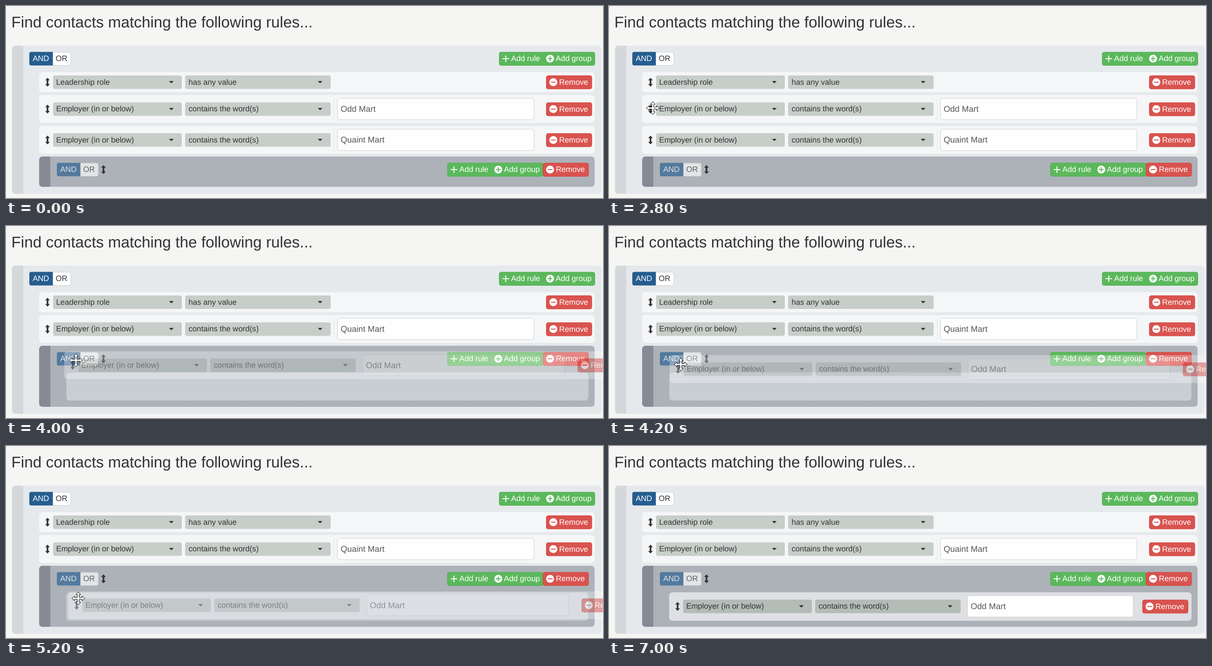
An HTML page for the animation above (8200 ms loop, 1280 by 412 pixels).

```html
<!DOCTYPE html>
<html lang="en">
<head>
<meta charset="utf-8">
<title>Contact rules</title>
<style>
html, body { margin: 0; width: 100%; height: 100%; overflow: hidden; background: #f5f5f4; }
svg { display: block; width: 1280px; height: 412px; }
text { font: 16.7px "Liberation Sans", Arial, sans-serif; fill: #333; text-rendering: geometricPrecision; }
.title { font-size: 33.3px; }
.value { font-size: 18px; fill: #555; }
.light { fill: #fff; }
.row { fill: #fff; fill-opacity: .6; }
.select { fill: #002000; fill-opacity: .19; }
.input { fill: #fefefe; stroke: #ccc; }
.green { fill: #5cb85c; stroke: #4cae4c; }
.red { fill: #d9534f; stroke: #d43f3a; }
.line { fill: none; stroke-width: 2; }
.slot { fill: #f5f4ff; fill-opacity: .4; stroke: #c3c7cc; stroke-dasharray: 3 2; }

.mark, .before, .after, .slot1, .slot2, .dropped, .group, .tall, .ghost, .arrow, .move {
  animation: 8200ms step-end infinite;
}
.mark { animation-name: mark; }
.before { animation-name: before; }
.after { animation-name: after; }
.slot1 { animation-name: slot1; }
.slot2 { animation-name: slot2; }
.dropped { animation-name: dropped; }
.group { animation-name: group; }
.tall { height: 65px; animation-name: tall; }
.ghost { animation-name: ghost; }
.arrow { animation-name: arrow; }
.move { animation-name: move; }

@keyframes mark { 0% { opacity: 0 } 2.43%, 100% { opacity: 1 } }
@keyframes before { 0% { opacity: 1 } 46.34%, 100% { opacity: 0 } }
@keyframes after { 0% { opacity: 0 } 46.34%, 100% { opacity: 1 } }
@keyframes slot1 { 0% { opacity: 0 } 46.34% { opacity: 1 } 48.78%, 100% { opacity: 0 } }
@keyframes slot2 { 0% { opacity: 0 } 48.78% { opacity: 1 } 68.29%, 100% { opacity: 0 } }
@keyframes dropped { 0% { opacity: 0 } 68.29%, 100% { opacity: 1 } }
@keyframes group {
  0% { transform: translate(71px, 323px) }
  48.78%, 100% { transform: translate(71px, 257px) }
}
@keyframes tall { 0% { height: 65px } 48.78%, 100% { height: 131px } }
@keyframes ghost {
  0% { opacity: 0; transform: translate(71px, 191px) }
  46.34% { opacity: .5; transform: translate(84px, 223.5px) }
  48.78% { opacity: .5; transform: translate(125px, 268.5px) }
  51.21% { opacity: .5; transform: translate(130px, 277px) }
  53.65% { opacity: .5; transform: translate(133px, 284px) }
  56.09% { opacity: .5; transform: translate(133.5px, 289.5px) }
  58.53% { opacity: .5; transform: translate(125px, 271px) }
  60.97% { opacity: .5; transform: translate(130px, 293px) }
  63.41% { opacity: .5; transform: translate(133.5px, 311.5px) }
  68.29%, 100% { opacity: 0; transform: translate(133.5px, 311.5px) }
}
@keyframes arrow {
  0% { opacity: 0; transform: translate(168px, 279px) }
  14.63% { opacity: 1; transform: translate(168px, 279px) }
  17.07% { opacity: 1; transform: translate(152px, 256px) }
  19.51% { opacity: 1; transform: translate(132px, 228px) }
  21.95% { opacity: 1; transform: translate(113px, 203px) }
  24.39% { opacity: 1; transform: translate(98px, 189px) }
  26.82% { opacity: 1; transform: translate(95px, 207px) }
  31.70% { opacity: 0; transform: translate(95px, 207px) }
  75.60% { opacity: 1; transform: translate(158px, 338px) }
  78.04% { opacity: 1; transform: translate(166px, 352px) }
  80.48% { opacity: 1; transform: translate(175px, 372px) }
  82.92% { opacity: 1; transform: translate(184px, 394px) }
  85.36%, 100% { opacity: 0; transform: translate(184px, 394px) }
}
@keyframes move {
  0% { opacity: 0; transform: translate(93px, 218px) }
  31.70% { opacity: 1; transform: translate(93px, 218px) }
  34.14% { opacity: 1; transform: translate(94px, 219px) }
  36.58% { opacity: 1; transform: translate(93px, 220px) }
  39.02% { opacity: 1; transform: translate(92px, 220px) }
  43.90% { opacity: 1; transform: translate(94px, 222px) }
  46.34% { opacity: 1; transform: translate(118px, 252px) }
  48.78% { opacity: 1; transform: translate(150px, 288px) }
  51.21% { opacity: 1; transform: translate(154px, 297px) }
  53.65% { opacity: 1; transform: translate(155px, 304px) }
  56.09% { opacity: 1; transform: translate(155.5px, 310.5px) }
  58.53% { opacity: 1; transform: translate(148px, 291px) }
  60.97% { opacity: 1; transform: translate(152px, 312px) }
  63.41% { opacity: 1; transform: translate(155px, 327px) }
  75.60%, 100% { opacity: 0; transform: translate(155px, 327px) }
}
</style>
</head>
<body>
<svg viewBox="0 0 1280 412">
  <defs>
    <path id="handle" fill="#333" d="M0-9.5L5-4H1.8V4H5L0 9.5L-5 4H-1.8V-4H-5Z"/>
    <path id="caret" fill="#333" d="M-5-2.5H5L0 2.5Z"/>

    <!-- Parts below have y = 0 at their vertical middle -->
    <g id="fields">
      <use href="#handle" x="18"/>
      <rect class="select" x="30" y="-14.5" width="276" height="29" rx="4"/>
      <rect class="select" x="313" y="-14.5" width="312" height="29" rx="4"/>
      <use href="#caret" x="283.5"/>
      <use href="#caret" x="602.5"/>
    </g>
    <g id="employer">
      <use href="#fields"/>
      <text x="36.5" y="4.9">Employer (in or below)</text>
      <text x="320.5" y="4.9">contains the word(s)</text>
    </g>
    <g id="remove">
      <rect class="red" x=".5" y="-14" width="97.5" height="28.5" rx="4"/>
      <circle class="light" cx="15.5" r="8.5"/>
      <path class="line" stroke="#d9534f" d="M10.5 0h10"/>
      <text class="light" x="28" y="5.4">Remove</text>
    </g>
    <g id="adds">
      <rect class="green" x=".5" y="-14" width="205" height="28.5" rx="4"/>
      <path class="line" stroke="#fff" d="M7.500 0h14M14.500-7v14"/>
      <text class="light" x="26" y="5.4">Add rule</text>
      <circle class="light" cx="109.500" r="8.5"/>
      <path class="line" stroke="#5cb85c" d="M104.500 0h10M109.500-5v10"/>
      <text class="light" x="121.5" y="5.4">Add group</text>
    </g>
    <g id="toggle">
      <rect x=".5" y="-14" width="88.500" height="28.5" rx="4" fill="#fff" stroke="#ccc"/>
      <path fill="#255d8f" d="M50.500-14.500V14.500H4a4 4 0 0 1-4-4V-10.500a4 4 0 0 1 4-4Z"/>
      <text class="light" x="7.2" y="5.4">AND</text>
      <text x="56.5" y="5.4">OR</text>
    </g>
    <g id="wide">
      <rect class="row" width="1191" height="60" rx="7"/>
      <path stroke="#e3e6ea" d="M632.500 7v47"/>
      <use href="#employer" y="30.3"/>
      <rect class="input" x="639.5" y="7" width="421.5" height="46" rx="5"/>
      <use href="#remove" x="1087" y="30.3"/>
    </g>
  </defs>

  <text class="title" x="11.5" y="45.5">Find contacts matching the following rules...</text>

  <rect x="13" y="85" width="60" height="318" rx="7" fill="#d5d8da"/>
  <rect x="37" y="85" width="1240" height="318" rx="7" fill="#e6e9ec"/>
  <rect x="37" y="85" width="20" height="318" fill="#e6e9ec"/>
  <use href="#toggle" x="50" y="113"/>
  <use href="#adds" x="1057" y="113"/>

  <g transform="translate(71 142)">
    <rect class="row" width="1191" height="43" rx="7"/>
    <use href="#fields" y="21.5"/>
    <text x="36.5" y="26.700">Leadership role</text>
    <text x="320.5" y="26.700">has any value</text>
    <use href="#remove" x="1087" y="21.5"/>
  </g>

  <g transform="translate(71 191)">
    <use href="#wide"/>
    <text class="value before" x="646.5" y="36">Odd Mart</text>
    <text class="value after" x="646.5" y="36">Quaint Mart</text>
  </g>

  <g class="before">
    <g transform="translate(71 257.300)">
      <use href="#wide"/>
      <text class="value" x="646.5" y="36">Quaint Mart</text>
    </g>
  </g>

  <rect class="slot slot1" x="71.5" y="257.5" width="1190" height="60" rx="7"/>

  <g class="group">
    <rect class="tall" width="60" rx="7" fill="#868a94"/>
    <rect class="tall" x="24" width="1167" rx="7" fill="#acb2b8"/>
    <rect class="tall" x="24" width="20" fill="#acb2b8"/>
    <use href="#toggle" x="38" y="28" opacity=".65"/>
    <use href="#handle" x="138" y="28"/>
    <use href="#adds" x="875" y="28"/>
    <use href="#remove" x="1080" y="28"/>
  </g>

  <rect class="slot slot2" x="129.500" y="314.5" width="1119" height="60" rx="7"/>

  <g class="dropped">
    <g transform="translate(129 314)">
      <rect class="row" width="1120" height="61" rx="7"/>
      <use href="#employer" y="30.3"/>
      <rect class="input" x="639.5" y="7" width="355.500" height="46" rx="5"/>
      <text class="value" x="646.5" y="36">Odd Mart</text>
      <use href="#remove" x="1014.500" y="30.3"/>
    </g>
  </g>

  <g class="ghost">
    <rect class="row" width="1205" height="60" rx="7"/>
    <path stroke="#e3e6ea" stroke-opacity=".6" d="M632.500 7v47"/>
    <use href="#employer" y="30.3"/>
    <rect class="input" x="639.5" y="7" width="433" height="46" rx="5" fill-opacity=".3"
      style="fill-opacity:.3"/>
    <text class="value" x="646.5" y="36">Odd Mart</text>
    <use href="#remove" x="1100.500" y="30.3"/>
  </g>

  <path class="arrow" fill="#fff" stroke="#000" d="M0 0V21l5-5 3 8 4-2-3-7h7Z"/>
  <path class="move" fill="#fff" stroke="#000"
    d="M0-14l5 6H2V-2H8V-5l6 5-6 5V2H2V8H5L0 14l-5-6h3V2H-8v3l-6-5 6-5v3h6V-8h-3Z"/>
  <rect class="mark" width="1" height="1" fill="#333"/>
</svg>
</body>
</html>
```
